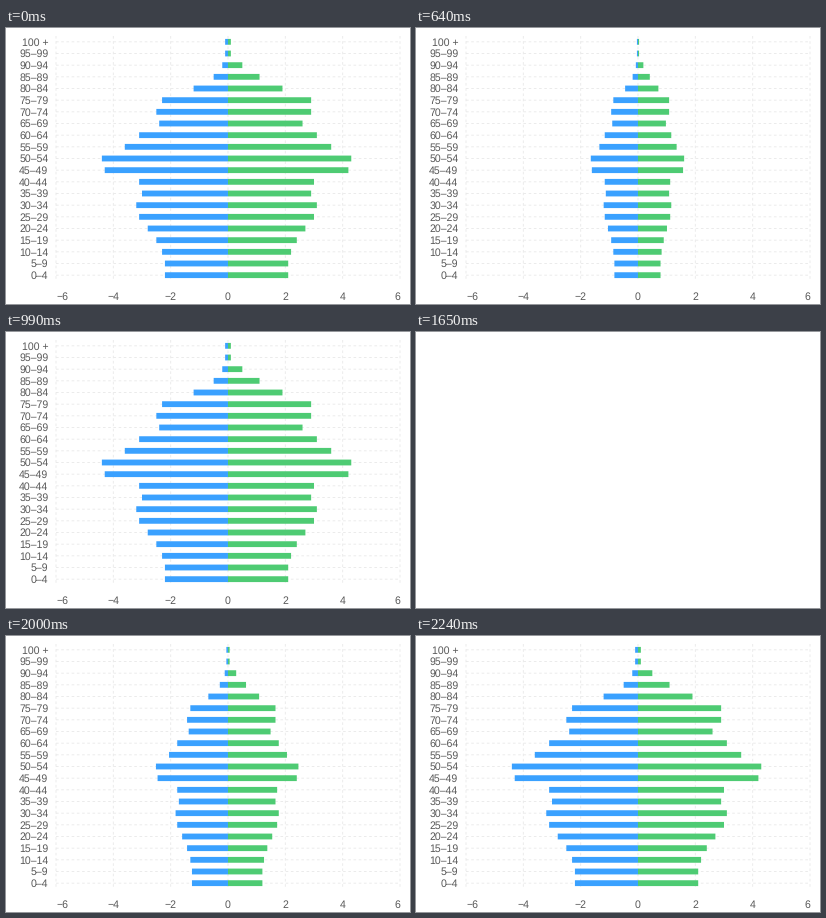
Recreate the animation shown at these times as a matplotlib script. Size 404 by 276 pixels, loop 3.52 s.

```python
import numpy as np
import matplotlib.pyplot as plt
from matplotlib.animation import FuncAnimation
from matplotlib.collections import LineCollection, PolyCollection

plt.rcParams["text.hinting"] = "none"

W, H, DPI = 404, 276, 64
PT = 72 / DPI                      # points per pixel
TICK, LOOP = 10, 3520              # ms
STARTS, STEP = (405.5, 1646.3), 58.4
CLEARED, LAST = 2, 10              # steps spent empty, step of full size
LEFT, RIGHT, TOP, BOTTOM = 50, 394, 8, 253
ZERO, UNIT = (LEFT + RIGHT) / 2, (RIGHT - LEFT) / 12
BLUE, GREEN, GRID, INK = "#3aa1ff", "#4ecb73", "#e9e9e9", "#595959"
FONT = dict(family="Liberation Sans", size=10.5 * PT, color=INK, va="baseline")

groups = [f"{a}–{a + 4}" for a in range(0, 100, 5)] + ["100 +"]
age = np.arange(len(groups))
band = (BOTTOM - TOP) / len(groups)
rows = BOTTOM - band * (age + 0.5)


def wave(center, height, width):
    return height * np.exp(-((age - center) / width) ** 2)


def share(x):
    return np.maximum(np.round(x, 1), 0.1)


# steady births, mortality in old age, and a few larger cohorts
survival = 1 / (1 + np.exp((age - 15.97) / 0.8))
people = ((2.15 + 0.02 * age) * survival + wave(5.8, 0.94, 2.4)
          + wave(9.55, 2.25, 1.15) + wave(11.45, 1, 0.9)
          + wave(14.65, 0.47, 0.75))
blue = share(people)
green = share(people - 0.1 + wave(15.7, 0.78, 2.75))


def growth(ms):
    """Bar scale at a time; 0 means the stage is cleared."""
    for start in STARTS:
        k = (ms - start) // STEP
        if 0 <= k < LAST:
            return 0 if k < CLEARED else 0.0985 * (k - 0.2)
    return 1


fig = plt.figure(figsize=(W / DPI, H / DPI), dpi=DPI, facecolor="white")
ax = fig.add_axes([0, 0, 1, 1])
ax.set(xlim=(0, W), ylim=(H, 0))
ax.axis("off")

ticks = range(-6, 7, 2)
lines = [[(ZERO + v * UNIT, TOP), (ZERO + v * UNIT, BOTTOM)] for v in ticks]
lines += [[(LEFT, y), (RIGHT, y)] for y in rows]
parts = [ax.add_collection(LineCollection(
    lines, colors=GRID, linewidths=0.87 * PT, linestyles=[(0, (3, 3))],
    snap=False, zorder=1))]

for y, name in zip(rows, groups):
    parts.append(ax.text(42.4, y + 3.8, name, ha="right", **FONT))
for v in ticks:
    x, align = {-6: (LEFT, "left"), 6: (RIGHT, "right")}.get(
        v, (ZERO + v * UNIT, "center"))
    parts.append(ax.text(x, 271.7, str(v).replace("-", "−"), ha=align, **FONT))


def add_bars(color):
    bars = PolyCollection([], facecolors=color, edgecolors="none",
                          linewidths=0, snap=False, zorder=2)
    parts.append(ax.add_collection(bars, autolim=False))
    return bars


def set_bars(bars, values):
    half = band / 4
    bars.set_verts([[(ZERO, y - half), (ZERO + v * UNIT, y - half),
                     (ZERO + v * UNIT, y + half), (ZERO, y + half)]
                    for y, v in zip(rows, values)])


left_bars, right_bars = add_bars(BLUE), add_bars(GREEN)


def update(i):
    scale = growth(i * TICK)
    for part in parts:
        part.set_visible(scale > 0)
    set_bars(left_bars, -blue * scale)
    set_bars(right_bars, green * scale)
    return parts


anim = FuncAnimation(fig, update, frames=LOOP // TICK, interval=TICK,
                     repeat=True, repeat_delay=0, blit=False)
plt.show()
```
